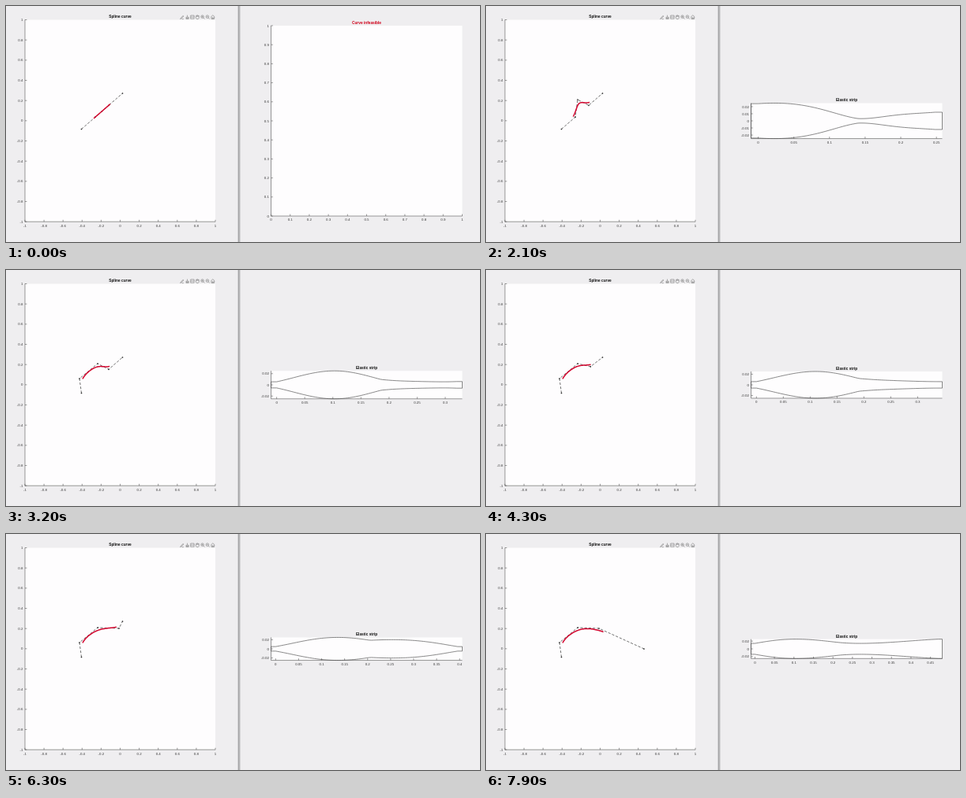
An HTML page for the animation above (8000 ms loop, 600x300 px).

```html
<!DOCTYPE html>
<html lang="en">
<head>
<meta charset="utf-8">
<title>Spline curve and elastic strip</title>
<style>
  html, body { margin: 0; width: 100%; height: 100%; overflow: hidden; background: #efeef0; }
  svg { display: block; width: 600px; height: 300px; }
  text { font-family: "Liberation Sans", Arial, sans-serif; font-size: 4.4px; fill: #333; }
  .title { font-size: 4.8px; font-weight: bold; text-anchor: middle; fill: #111; }
  .bad { fill: #d0021b; }
  .mid { text-anchor: middle; }
  .end { text-anchor: end; }
  .axis { fill: none; stroke: #555; stroke-width: .6; }
  .strip { fill: none; stroke: #4a4a4a; stroke-width: .65; stroke-linejoin: round; }
  .poly { fill: none; stroke: #333; stroke-width: .7; stroke-dasharray: 3.2 2; }
  .curve { fill: none; stroke: #d2042d; stroke-width: 1.5; stroke-linecap: round; }
  .icon { fill: none; stroke: #777; stroke-width: .6; }
</style>
</head>
<body>
<svg viewBox="0 0 600 300" xmlns="http://www.w3.org/2000/svg">
  <defs>
    <linearGradient id="edge">
      <stop offset="0" stop-color="#efeef0"/>
      <stop offset=".3" stop-color="#a2a2a4"/>
      <stop offset=".5" stop-color="#b4b4b6"/>
      <stop offset="1" stop-color="#efeef0"/>
    </linearGradient>
  </defs>
  <rect width="600" height="300" fill="#efeef0"/>
  <rect x="293" width="4.5" height="300" fill="url(#edge)"/>
  <g id="left"></g>
  <g class="icon">
    <path d="M220.5 16.5l1.3-1.6 2.2-2.6 .8 .7-2.3 2.4zM222.5 16.6h2.4"/>
    <path d="M229.5 11.6v2.2M228 16.4v-2.2h3.2v2.2zM228 15.4h3"/>
    <path d="M233.7 12h4.4v4.2h-4.4zM234 14.8l1.4-1.2 1.2 1 1.4-1.4"/>
    <path d="M240.6 14v-1.6h1v-.6h1.2v.6h1.4v2.8l-.9 1.3h-1.9l-1.3-1.6zM241.8 12.4v1.6M243 12.4v1.6"/>
    <circle cx="248.6" cy="13.6" r="1.8"/>
    <path d="M250 15l1.4 1.5M247.7 13.6h1.8M248.6 12.7v1.8"/>
    <circle cx="254.9" cy="13.6" r="1.8"/>
    <path d="M256.3 15l1.4 1.5M254 13.6h1.8"/>
    <path d="M259.3 14l2.5-2.3 2.5 2.3M260 13.8v2.6h3.6v-2.6M261.3 16.4v-1.6h1v1.6"/>
  </g>
  <g id="spline"></g>
  <g id="right"></g>
</svg>
<script>
const LOOP = 8000, STEP = 100, TAB = .01, HALF = .025;
const $ = id => document.getElementById(id);
const clamp = u => Math.max(0, Math.min(1, u));
const smooth = u => u * u * (3 - 2 * u);
const easeOut = p => u => 1 - (1 - u) ** p;
const part = (t, from, to, ease = u => u) => ease(clamp((t - from) / (to - from)));
const mix = (a, b, u) => a.map((v, i) => v + (b[i] - v) * u);
const range = (a, b, d) => {
  const out = [];
  for (let i = Math.ceil(a / d - 1e-6); i * d <= b + 1e-9; i++) out.push(+(i * d).toFixed(2));
  return out;
};
const fix = v => v.toFixed(2);
const path = pts => 'M' + pts.map(p => fix(p[0]) + ' ' + fix(p[1])).join('L');

function axes({ x, y, w, h, xlim, ylim, xt, yt, title, cls = '' }) {
  const mx = v => x + w * (v - xlim[0]) / (xlim[1] - xlim[0]);
  const my = v => y + h * (ylim[1] - v) / (ylim[1] - ylim[0]);
  const b = y + h;
  let lines = `M${x} ${fix(y)}V${fix(b)}H${x + w}`, labels = '';
  for (const v of xt) {
    lines += `M${fix(mx(v))} ${fix(b)}v-2.4`;
    labels += `<text class="mid" x="${fix(mx(v))}" y="${fix(b + 6.4)}">${v}</text>`;
  }
  for (const v of yt) {
    lines += `M${x} ${fix(my(v))}h2.4`;
    labels += `<text class="end" x="${x - 2.6}" y="${fix(my(v) + 1.6)}">${v}</text>`;
  }
  const svg = `<rect x="${x}" y="${fix(y)}" width="${w}" height="${fix(h)}" fill="#fefdfe"/>
    <path class="axis" d="${lines}"/>${labels}
    <text class="title ${cls}" x="${x + w / 2}" y="${fix(y - 2.1)}">${title}</text>`;
  return { svg, mx, my };
}

// Control points in stage pixels at time t
function controls(t) {
  const p1 = mix([113, 141.2], [93, 138], part(t, 2100, 3200, smooth));
  const p2 = mix([121.5, 133.75], [116, 119], part(t, 600, 1400, easeOut(1.5)));
  let p3 = mix([130, 126.3], [138, 114], part(t, 4100, 4800));
  p3 = mix(p3, [143, 120], part(t, 4800, 5400, easeOut(1.6)));
  let p4 = mix([147.5, 111], [164.5, 119.5], part(t, 6400, 6800));
  p4 = mix(p4, [200, 146], part(t, 6800, 7900, easeOut(1.3)));
  return [[95.5, 156.5], p1, p2, p3, p4];
}

// Uniform cubic B-spline, u in 0..2, with signed curvature k
function spline(P, u) {
  const i = Math.min(1, Math.floor(u)), f = u - i, g = 1 - f;
  const sum = ws => [0, 1].map(d => ws.reduce((a, w, j) => a + w * P[i + j][d], 0));
  const [x, y] = sum([g ** 3 / 6, (3 * f ** 3 - 6 * f * f + 4) / 6,
    (-3 * f ** 3 + 3 * f * f + 3 * f + 1) / 6, f ** 3 / 6]);
  const v = sum([-g * g / 2, (3 * f * f - 4 * f) / 2, (-3 * f * f + 2 * f + 1) / 2, f * f / 2]);
  const a = sum([g, 3 * f - 2, 1 - 3 * f, f]);
  return { u, x, y, k: (v[0] * a[1] - v[1] * a[0]) / Math.hypot(...v) ** 3 };
}

function sample(P, n) {
  return Array.from({ length: n + 1 }, (_, i) => spline(P, 2 * i / n));
}

function inflections(P, pts) {
  const out = [];
  for (let i = 1; i < pts.length; i++) {
    let a = pts[i - 1], b = pts[i];
    if (a.k * b.k >= 0) continue;
    for (let j = 0; j < 45; j++) {
      const m = spline(P, (a.u + b.u) / 2);
      if (m.k * a.k > 0) a = m; else b = m;
    }
    out.push(a);
  }
  return out;
}

const mean = a => a.reduce((s, v) => s + v, 0) / a.length;

function spread(w) {
  const lo = Math.min(...w);
  return lo > 1e-6 ? Math.max(...w) / lo : 1e9 * (1 - lo);
}

// Least max/min ratio of w plus any mix of the directions
function flattest(w, dirs) {
  if (!dirs.length) return w;
  const [d, ...rest] = dirs;
  const at = a => flattest(w.map((v, i) => v + a * d[i]), rest);
  let lo = -60, hi = 60;
  for (let i = 0; i < 42; i++) {
    const a = lo + (hi - lo) / 3, b = hi - (hi - lo) / 3;
    if (spread(at(a)) < spread(at(b))) hi = b; else lo = a;
  }
  return at((lo + hi) / 2);
}

// Stiffness along the curve: a linear function of position over curvature
function widths(P, pts) {
  const flex = inflections(P, pts);
  const over = fn => pts.map(p => fn(p) / p.k);
  let w, dirs = [];
  if (flex.length === 0) {
    const inv = over(() => 1), m = mean(inv);
    const cx = mean(over(p => p.x)) / m, cy = mean(over(p => p.y)) / m;
    w = inv.map(v => v / m);
    dirs = [over(p => (p.x - cx) / m), over(p => (p.y - cy) / m)];
  } else if (flex.length === 1) {
    const [q] = flex;
    const hx = over(p => p.x - q.x), hy = over(p => p.y - q.y);
    const mx = mean(hx), my = mean(hy), r = mx * mx + my * my;
    w = hx.map((v, i) => (mx * v + my * hy[i]) / r);
    dirs = [hx.map((v, i) => (mx * hy[i] - my * v) / r)];
  } else {
    const [q, e] = flex;
    w = over(p => (e.x - q.x) * (p.y - q.y) - (e.y - q.y) * (p.x - q.x));
    const m = mean(w);
    w = w.map(v => v / m);
  }
  w = flattest(w, dirs);
  const top = Math.max(...w);
  return Math.min(...w) > 0 ? w.map(v => v * HALF / top) : null;
}

function stripPlot(P) {
  const unit = P.map(([x, y]) => [(x - 144.5) / 120.6, (146 - y) / 128.4]);
  const pts = sample(unit, 81);
  const w = widths(unit, pts);
  if (!w) return emptyPlot();
  let s = 0;
  const edge = pts.map((p, i) => {
    if (i) s += Math.hypot(p.x - pts[i - 1].x, p.y - pts[i - 1].y);
    return [s, w[i]];
  });
  edge.unshift([-TAB, w[0]]);
  edge.push([s + TAB, w[w.length - 1]]);
  const scale = 242 / (s + 2 * TAB), h = 2 * HALF * scale;
  const ax = axes({
    x: 335.5, y: 146 - h / 2, w: 242, h,
    xlim: [-TAB, s + TAB], ylim: [-HALF, HALF],
    xt: range(0, s + TAB, .05), yt: range(-.02, .02, scale > 800 ? .01 : .02),
    title: 'Elastic strip'
  });
  const line = edge.concat(edge.map(([a, b]) => [a, -b]).reverse());
  return ax.svg + `<path class="strip" d="${path(line.map(([a, b]) => [ax.mx(a), ax.my(b)]))}Z"/>`;
}

function emptyPlot() {
  const ticks = range(0, 1, .1);
  return axes({
    x: 335.5, y: 25, w: 242, h: 242, xlim: [0, 1], ylim: [0, 1],
    xt: ticks, yt: ticks, title: 'Curve infeasible', cls: 'bad'
  }).svg;
}

function splinePlot(P) {
  const dots = P.map(([x, y]) => `<circle cx="${fix(x)}" cy="${fix(y)}" r=".85" fill="#222"/>`).join('');
  const line = sample(P, 60).map(p => [p.x, p.y]);
  return `<path class="poly" d="${path(P)}"/>${dots}<path class="curve" d="${path(line)}"/>`;
}

const cache = new Map();
function picture(t) {
  if (!cache.has(t)) {
    const P = controls(t);
    cache.set(t, [splinePlot(P), t < 700 ? emptyPlot() : stripPlot(P)]);
  }
  return cache.get(t);
}

const ticks = range(-1, 1, .2);
$('left').innerHTML = axes({
  x: 24, y: 17.5, w: 241, h: 256.7, xlim: [-1, 1], ylim: [-1, 1],
  xt: ticks, yt: ticks, title: 'Spline curve'
}).svg;

let shown = -1;
function draw(ms) {
  const t = Math.floor(ms % LOOP / STEP) * STEP;
  if (t !== shown) {
    [$('spline').innerHTML, $('right').innerHTML] = picture(t);
    shown = t;
  }
}

const start = performance.now();
function loop() {
  draw(performance.now() - start);
  requestAnimationFrame(loop);
}
loop();
</script>
</body>
</html>
```
